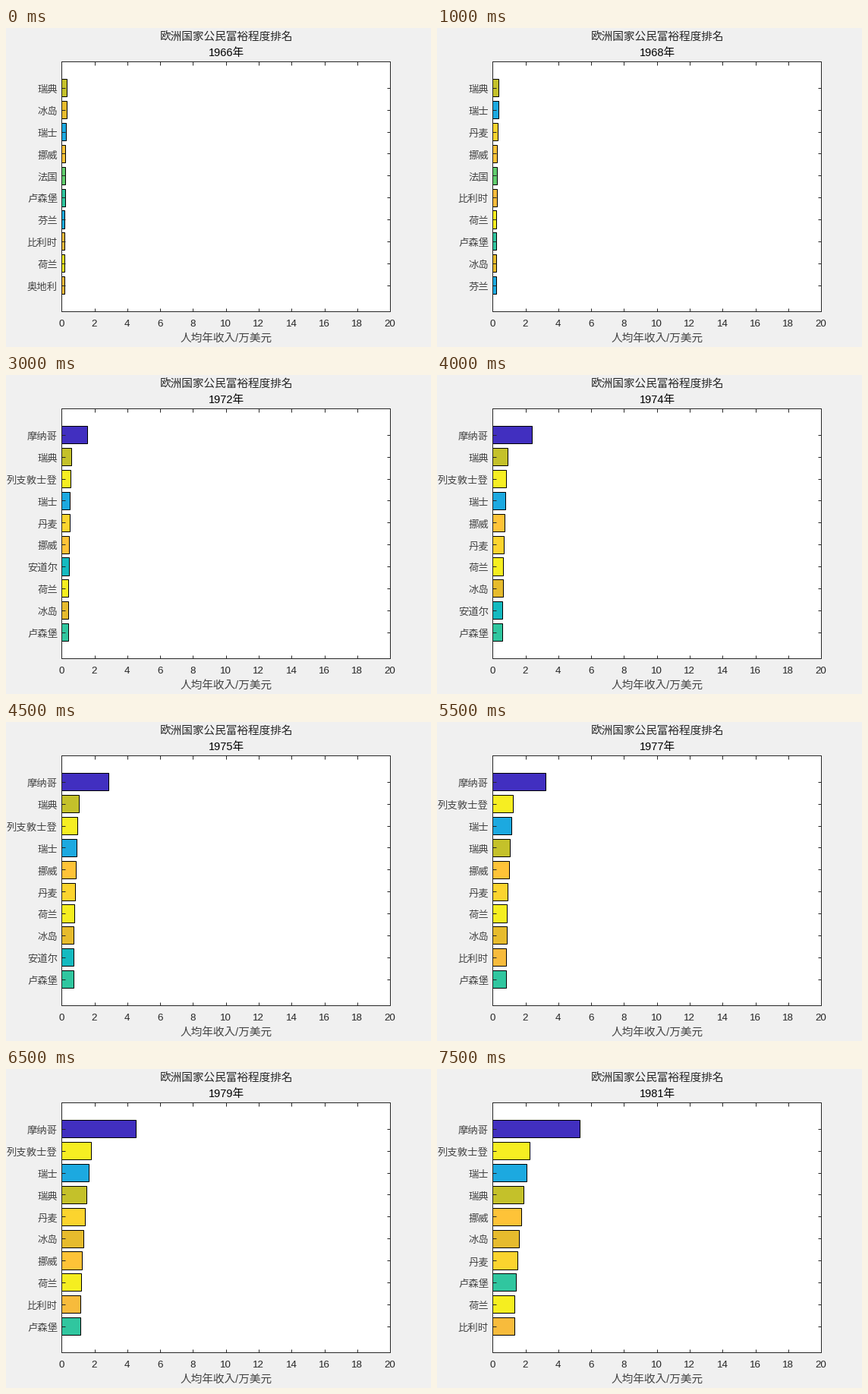
These frames come from a looping animation (560x420 px, 8 s). A matplotlib script:

```python
import matplotlib.pyplot as plt
import numpy as np
from matplotlib.animation import FuncAnimation
from matplotlib.patches import Rectangle

plt.rcParams["font.family"] = ["Liberation Sans", "Noto Sans CJK JP"]

PX = 0.72  # one pixel in points at 100 dpi
W, H = 560, 420
LEFT, RIGHT, TOP, BOTTOM = 73.2, 506.2, 44.2, 373.2
ROWS, X_MAX = 10, 20
FIRST_YEAR, YEARS = 1966, 16
STEP = (BOTTOM - TOP) / 11.4
GREY, SOFT = "#262626", "#444444"

COLORS = {
    "摩纳哥": "#412fc0", "列支敦士登": "#f6ee22", "安道尔": "#14bac0",
    "丹麦": "#fbd42e", "瑞典": "#c4c12a", "冰岛": "#e6bb2d",
    "瑞士": "#1ca9e0", "挪威": "#fec338", "法国": "#61cd6e",
    "卢森堡": "#30c69f", "芬兰": "#1caae0", "比利时": "#f7bb3c",
    "荷兰": "#f5ee20", "奥地利": "#fdba3a",
}

# Order from the given year on
RANKINGS = {
    1966: "瑞典 冰岛 瑞士 挪威 法国 卢森堡 芬兰 比利时 荷兰 奥地利",
    1968: "瑞典 瑞士 丹麦 挪威 法国 比利时 荷兰 卢森堡 冰岛 芬兰",
    1972: "摩纳哥 瑞典 列支敦士登 瑞士 丹麦 挪威 安道尔 荷兰 冰岛 卢森堡",
    1974: "摩纳哥 瑞典 列支敦士登 瑞士 挪威 丹麦 荷兰 冰岛 安道尔 卢森堡",
    1976: "摩纳哥 列支敦士登 瑞士 瑞典 挪威 丹麦 荷兰 冰岛 比利时 卢森堡",
    1978: "摩纳哥 列支敦士登 瑞士 瑞典 丹麦 冰岛 挪威 荷兰 比利时 卢森堡",
    1980: "摩纳哥 列支敦士登 瑞士 瑞典 挪威 冰岛 丹麦 卢森堡 荷兰 比利时",
}

fig = plt.figure(figsize=(5.6, 4.2), dpi=100, facecolor="#f0f0f0")
ax = fig.add_axes([0, 0, 1, 1])
ax.set(xlim=(0, W), ylim=(H, 0))
ax.axis("off")


def text(x, y, s, size, color=GREY, ha="center"):
    return ax.text(x, y, s, fontsize=size * PX, color=color, ha=ha,
                   va="baseline", zorder=4)


def line(x0, y0, x1, y1):
    ax.plot([x0, x1], [y0, y1], color=GREY, lw=PX, zorder=3,
            solid_capstyle="butt")


def x_pos(value):
    return LEFT + (RIGHT - LEFT) * value / X_MAX


def row_y(row):
    return TOP + STEP * (row + 1.2)


def ranking(year):
    return RANKINGS[max(y for y in RANKINGS if y <= year)].split()


def incomes(year, names):
    """Incomes by rank, falling in a curve from the top to the tenth place."""
    low = np.interp(year, [1966, 1970, 1972, 1975, 1977, 1979, 1981],
                    [0.16, 0.25, 0.39, 0.71, 0.81, 1.13, 1.32])
    top = low * (1.48 + 0.0065 * (year - 1975) ** 2)
    has_leader = names[0] == "摩纳哥"
    rest = low + (top - low) * np.linspace(1, 0, ROWS - has_leader) ** 1.7
    return [4 * low, *rest] if has_leader else rest


ax.add_patch(Rectangle((LEFT, TOP), RIGHT - LEFT, BOTTOM - TOP,
                       fc="white", ec="none", zorder=0))
ax.add_patch(Rectangle((LEFT, TOP), RIGHT - LEFT, BOTTOM - TOP,
                       fill=False, ec=GREY, lw=PX, zorder=3))
for v in range(0, X_MAX + 1, 2):
    x = x_pos(v)
    line(x, TOP, x, TOP + 4.5)
    line(x, BOTTOM, x, BOTTOM - 4.5)
    text(x - 0.2, 393, str(v), 13.33)

bars, labels = [], []
for row in range(ROWS):
    y = row_y(row)
    line(LEFT, y, LEFT + 4.5, y)
    line(RIGHT, y, RIGHT - 4.5, y)
    bars.append(ax.add_patch(Rectangle((LEFT, y - 0.4 * STEP), 0, 0.8 * STEP,
                                       ec="black", lw=PX, zorder=2)))
    labels.append(text(68, y + 6.3, "", 13.33, SOFT, ha="right"))

text(290.5, 17, "欧洲国家公民富裕程度排名", 14.67, GREY)
year_text = text(290.5, 37, "", 14.67, "black")
text(290.5, 413.5, "人均年收入/万美元", 14.67, SOFT)


def update(i):
    year = FIRST_YEAR + i
    year_text.set_text(f"{year}年")
    names = ranking(year)
    for bar, label, name, value in zip(bars, labels, names,
                                       incomes(year, names)):
        bar.set_width(x_pos(value) - LEFT)
        bar.set_facecolor(COLORS[name])
        label.set_text(name)
    return [year_text, *bars, *labels]


anim = FuncAnimation(fig, update, frames=YEARS, interval=500, repeat=True,
                     repeat_delay=0, blit=False)
plt.show()
```
